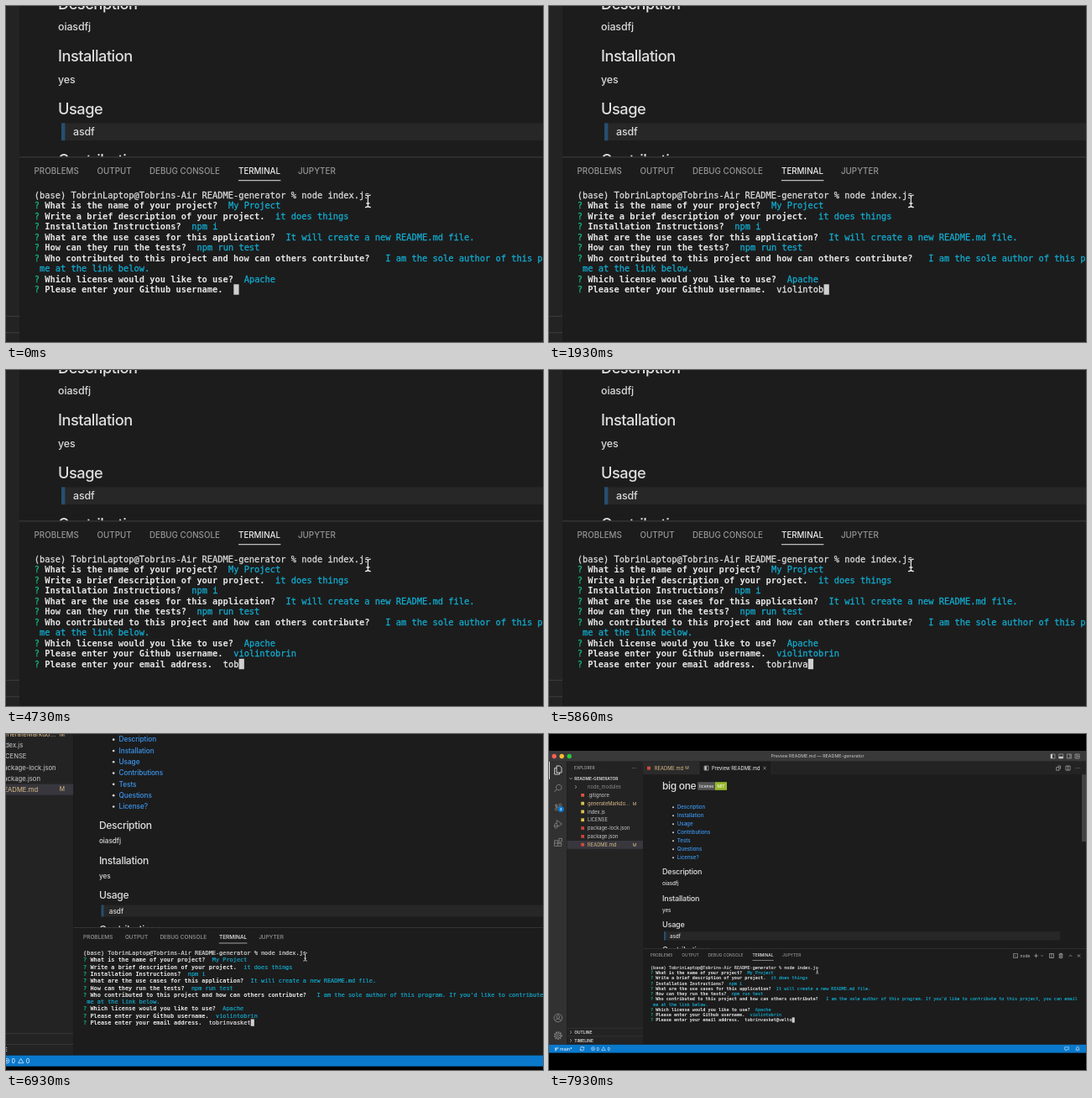
These frames come from a looping animation (640x400 px, 8000 ms). An HTML page with a canvas:

```html
<!DOCTYPE html>
<html lang="en">
<head>
<meta charset="utf-8">
<title>README generator</title>
<style>
  html, body { margin: 0; width: 100%; height: 100%; overflow: hidden; background: #000; }
  canvas { display: block; width: 640px; height: 400px; }
</style>
</head>
<body>
<canvas id="stage"></canvas>
<script>
const canvas = document.getElementById('stage');
const ctx = canvas.getContext('2d');
const dpr = window.devicePixelRatio || 1;
canvas.width = 640 * dpr;
canvas.height = 400 * dpr;

const LOOP = 8000;
const SANS = 'Inter, "Liberation Sans", sans-serif';
const MONO = '"DejaVu Sans Mono", "Liberation Mono", monospace';
const MONO_SIZE = 5.187, CHAR = 3.123, LINE = 6.25;
const TERM_X = 120.9, TERM_Y = 278;
const FOCUS = { x: 208, y: 331 };
const C = {
  editor: '#1c1c1c', side: '#232324', activity: '#313131', title: '#393939',
  tab: '#2b2b2b', line: '#3f3f3f', status: '#0a79cc', text: '#cccccc', dim: '#8a8a8a',
  white: '#e6e6e6', link: '#3c97f0', changed: '#dfbd8a', green: '#12b877', cyan: '#12acd0'
};

const USER = 'violintobrin';
const MAIL = 'tobrinvasket@velto';
const USER_KEYS = [[60, 1], [1000, 6], [1260, 6], [1900, 9], [2260, 12]];
const MAIL_KEYS = [[4060, 1], [4260, 2], [4400, 2], [5200, 6], [5820, 8], [6700, 12], [7000, 12], [7900, 18]];
const USER_SENT = 2600;
const ZOOM_START = 6413, ZOOM_TIME = 871;

function rect(x, y, w, h, color) {
  ctx.fillStyle = color;
  ctx.fillRect(x, y, w, h);
}

function dot(x, y, r, color) {
  ctx.fillStyle = color;
  ctx.beginPath();
  ctx.arc(x, y, r, 0, 7);
  ctx.fill();
}

// Text is set ten times larger and scaled down, so advances stay fractional.
function text(str, x, y, size, color, { weight = 400, font = SANS, track = 0, align = 'left', heft = 0 } = {}) {
  ctx.save();
  ctx.translate(x, y + size * 0.36);
  ctx.scale(0.1, 0.1);
  ctx.font = `${weight} ${size * 10}px ${font}`;
  ctx.letterSpacing = `${track * size * 10}px`;
  ctx.textAlign = align;
  ctx.fillStyle = ctx.strokeStyle = color;
  ctx.fillText(str, 0, 0);
  if (heft) {
    ctx.lineWidth = heft * size * 10;
    ctx.lineJoin = 'round';
    ctx.strokeText(str, 0, 0);
  }
  ctx.restore();
}

// Icon strokes are given around their own centre.
function icon(x, y, d, color = C.text, width = 0.6) {
  ctx.save();
  ctx.translate(x, y);
  ctx.strokeStyle = color;
  ctx.lineWidth = width;
  ctx.stroke(new Path2D(d));
  ctx.restore();
}

const I = {
  right: 'M-1 -1.8L.9 0L-1 1.8',
  down: 'M-1.8 -.9L0 .9L1.8 -.9',
  up: 'M-1.8 .9L0 -.9L1.8 .9',
  close: 'M-1.6 -1.6L1.6 1.6M1.6 -1.6L-1.6 1.6',
  plus: 'M-2.4 0H2.4M0 -2.4V2.4',
  box: 'M-2.5 -2.5H2.5V2.5H-2.5Z',
  split: 'M-2.5 -2.5H2.5V2.5H-2.5ZM0 -2.5V2.5',
  trash: 'M-2.4 -1.8H2.4M-1 -1.8V-2.7H1V-1.8M-1.8 -1.8V2.7H1.8V-1.8M-.6 -.6V1.6M.6 -.6V1.6',
  files: 'M-1.8 -5H2L4.2 -2.8V3H-1.8ZM-1.8 -2.4H-4.2V5H1.8V3',
  search: 'M-1.6 1.2A3.3 3.3 0 1 1 .2 2.3A3.3 3.3 0 0 1 -1.6 1.2L-4.6 4.7',
  branch: 'M-2 -2.2A1.4 1.4 0 1 1 -2.1 -2.2V2.2A1.4 1.4 0 1 1 -2.2 2.2M2.6 -.4A1.4 1.4 0 1 1 2.7 -.4C2.6 1.6 -2 .4 -2 2.2',
  debug: 'M-1.6 -.6V-4.8L4.6 -.4L.4 2.6M-4.4 1.2A1.9 2.2 0 1 1 -.6 1.2V2.6A1.9 2 0 1 1 -4.4 2.6ZM-5 2H0',
  blocks: 'M-4.4 -2.2H-.2V4.4H-4.4ZM-4.4 1H4V4.4H-.2M-.2 1H4M1 -4.6H4.6V-1H1Z',
  person: 'M-4.8 0A4.8 4.8 0 1 1 4.8 0A4.8 4.8 0 1 1 -4.8 0M-1.8 -1.2A1.8 1.8 0 1 1 1.8 -1.2A1.8 1.8 0 1 1 -1.8 -1.2M-3.2 3.4C-2.4 .4 2.4 .4 3.2 3.4',
  ring: 'M-1.4 0A1.4 1.4 0 1 1 1.4 0A1.4 1.4 0 1 1 -1.4 0',
  sync: 'M-2.2 -.2A2.2 2.2 0 0 1 2 -1M2.2 .2A2.2 2.2 0 0 1 -2 1M2.2 -2.2V-.8H.8M-2.2 2.2V.8H-.8',
  error: 'M-2 0A2 2 0 1 1 2 0A2 2 0 1 1 -2 0M-.8 -.8L.8 .8M.8 -.8L-.8 .8',
  warn: 'M0 -2L2.3 1.9H-2.3Z',
  chat: 'M-2.3 -2H2.3V1H.4L-1 2.4V1H-2.3Z',
  bell: 'M-2.2 1.4L-1.5 .4V-.8A1.5 1.5 0 0 1 1.5 -.8V.4L2.2 1.4ZM-.6 2.2H.6'
};

function more(x, y) {
  for (let i = -1; i <= 1; i++) dot(x + i * 1.9, y, 0.45, C.text);
}

function titleBar() {
  rect(0, 20, 640, 12.8, C.title);
  ['#fb5f57', '#fdbc2e', '#28c840'].forEach((c, i) => dot(6.2 + i * 9, 26.5, 2.7, c));
  text('Preview README.md — README-generator', 320, 26.4, 5.35, C.text, { align: 'center' });
  for (let i = 0; i < 4; i++) icon(600.5 + i * 9.7, 26.5, I.box, C.text, 0.5);
  rect(598, 24, 2, 5, C.text);
  rect(607.7, 26.8, 5, 2.2, C.text);
  icon(619.9, 26.5, 'M1 -2.5V2.5', C.text, 0.5);
  icon(629.6, 26.5, 'M-.5 -2.5V2.5M-.5 0H2.5', C.text, 0.5);
}

function activityBar() {
  rect(0, 32.8, 21.6, 337, C.activity);
  rect(0, 32.8, 0.9, 21, '#e8e8e8');
  icon(10.8, 43, I.files, '#f2f2f2', 0.8);
  [[64.5, I.search], [86, I.branch], [107.5, I.debug], [129, I.blocks], [338, I.person], [359, I.ring]]
    .forEach(([y, d]) => icon(10.8, y, d, C.dim, 0.8));
  dot(14.2, 89.5, 3.5, C.status);
  text('2', 14.2, 89.5, 4, '#fff', { align: 'center', weight: 600 });
  ctx.strokeStyle = C.dim;
  ctx.lineWidth = 1.4;
  ctx.setLineDash([1.55, 1.2]);
  ctx.beginPath();
  ctx.arc(10.8, 359, 4.2, 0, Math.PI * 2);
  ctx.stroke();
  ctx.setLineDash([]);
  icon(10.8, 359, 'M-3.2 0A3.2 3.2 0 1 1 3.2 0A3.2 3.2 0 1 1 -3.2 0', C.dim, 0.8);
}

const FILES = [
  ['node_modules', '#8b8b8b'],
  ['.gitignore', C.text, '#e0533a'],
  ['generateMarkdo...', C.changed, '#d9c04a', 'M'],
  ['index.js', C.text, '#d9c04a'],
  ['LICENSE', C.text, '#d9c04a'],
  ['package-lock.json', C.text, '#cc4038'],
  ['package.json', C.text, '#cc4038'],
  ['README.md', C.changed, '#d0493c', 'M']
];

function sideBar() {
  rect(21.6, 32.8, 90.4, 337, C.side);
  text('EXPLORER', 30, 40.6, 4.8, '#bbbbbb');
  more(101.2, 40.6);
  icon(26, 53, I.down);
  text('README-GENERATOR', 30.3, 53, 4.8, C.text, { weight: 700 });
  rect(21.6, 127, 90.4, 9.8, '#37373d');
  FILES.forEach(([name, color, mark, state], i) => {
    const y = 63 + i * 9.82;
    if (mark) rect(38.2, y - 1.9, 3.8, 3.8, mark);
    else icon(32, y, I.right);
    text(name, 46, y, 5.78, color);
    if (state) text(state, 102, y, 5.2, color, { align: 'center' });
  });
  ['OUTLINE', 'TIMELINE'].forEach((name, i) => {
    const y = 355 + i * 9.8;
    rect(21.6, y - 5.1, 90.4, 0.5, C.line);
    icon(26, y, I.right);
    text(name, 30.3, y, 4.8, C.text, { weight: 700 });
  });
}

function editor() {
  rect(112, 32.8, 528, 337, C.editor);
  rect(112, 32.8, 528, 15.4, C.side);
  rect(112, 32.8, 67.5, 15.4, C.tab);
  rect(180, 32.8, 84, 15.4, C.editor);
  rect(117, 38.7, 4, 4, '#d0493c');
  text('README.md', 125.8, 40.6, 5.78, C.changed);
  text('M', 164.6, 40.6, 5, C.changed, { align: 'center' });
  icon(187.5, 40.6, I.split);
  rect(185.5, 38.5, 2, 4.2, C.text);
  text('Preview README.md', 194, 40.6, 5.78, '#f5f5f5');
  icon(257, 40.6, I.close);
  icon(607, 40.6, 'M-2.3 -1H1V2.6H-2.3ZM-.6 -2.6H2.5V1', C.text);
  icon(618.5, 40.6, I.split);
  more(630, 40.6);

  const head = (s, y, size = 9.1) => text(s, 135, y, size, '#dedede', { track: -0.027, weight: 500 });
  const para = (s, x, y, color = '#dadada') => text(s, x, y, 6.22, color, { track: -0.01, weight: 500 });
  head('big one', 62, 12);
  rect(177.3, 57.2, 20.7, 9.6, '#555');
  rect(198, 57.2, 14, 9.6, '#97b92c');
  text('license', 187.7, 62, 5, '#fff', { align: 'center' });
  text('MIT', 205, 62, 5, '#fff', { align: 'center' });
  ['Description', 'Installation', 'Usage', 'Contributions', 'Tests', 'Questions', 'License?'].forEach((s, i) => {
    dot(148, 87.2 + i * 10, 1, '#d4d4d4');
    para(s, 152.8, 87 + i * 10, C.link);
  });
  head('Description', 164);
  para('oiasdfj', 135, 178);
  head('Installation', 195.3);
  para('yes', 135, 209.3);
  head('Usage', 226.6);
  rect(137, 235.2, 472, 10.4, '#272727');
  rect(137, 235.2, 2.2, 10.4, '#264f70');
  para('asdf', 144, 240.5);
  head('Contributions', 257);
  rect(635, 48.2, 5, 80, '#434343');
}

function panel() {
  rect(112, 255.2, 528, 114.6, C.editor);
  rect(112, 255.2, 528, 0.5, C.line);
  [['PROBLEMS', 120.8], ['OUTPUT', 158.3], ['DEBUG CONSOLE', 189.5], ['TERMINAL', 242.5], ['JUPYTER', 278]]
    .forEach(([s, x]) => text(s, x, 263.5, 4.89, s === 'TERMINAL' ? '#ececec' : '#969696', { weight: 500 }));
  rect(242.5, 269.1, 25.2, 0.5, '#e7e7e7');
  icon(556, 264, I.box, C.text, 0.5);
  icon(555.5, 264, 'M-1 -1L.2 0L-1 1M.6 1.2H2', C.text, 0.4);
  text('node', 561.5, 263.8, 5, C.text);
  icon(580.5, 264, I.plus);
  icon(587.5, 264, 'M-1.2 -.6L0 .6L1.2 -.6');
  icon(599, 264, I.split);
  icon(610, 264, I.trash);
  icon(621.5, 264, I.up);
  icon(631.5, 264, I.close);
}

function mono(s, col, row, color, weight = 400) {
  const heft = weight === 400 ? 0.025 : 0;
  text(s, TERM_X + col * CHAR, TERM_Y + row * LINE, MONO_SIZE, color, { weight, heft, font: MONO });
}

// Draws a prompt line and returns the column where its answer ends.
function ask(question, row, answer = '', color = C.cyan, gap = 2) {
  const col = 2 + question.length + gap;
  mono('?', 0, row, C.green);
  mono(question, 2, row, C.white, 700);
  mono(answer, col, row, color);
  return col + answer.length;
}

function caret(col, row) {
  rect(TERM_X + col * CHAR + 0.1, TERM_Y + row * LINE - 3.1, CHAR, 6.2, '#cfcfcf');
}

function typed(str, keys, t) {
  if (t < keys[0][0]) return '';
  const next = keys.findIndex(k => k[0] > t);
  if (next < 0) return str;
  const [t0, n0] = keys[next - 1], [t1, n1] = keys[next];
  return str.slice(0, Math.floor(n0 + (n1 - n0) * (t - t0) / (t1 - t0)));
}

function terminal(t) {
  mono('(base) TobrinLaptop@Tobrins-Air README-generator % node index.js', 0, 0, '#dcdcdc');
  ask('What is the name of your project?', 1, 'My Project');
  ask('Write a brief description of your project.', 2, 'it does things');
  ask('Installation Instructions?', 3, 'npm i');
  ask('What are the use cases for this application?', 4, 'It will create a new README.md file.');
  ask('How can they run the tests?', 5, 'npm run test');
  ask('Who contributed to this project and how can others contribute?', 6,
    "I am the sole author of this program. If you'd like to contribute to this project, you can email", C.cyan, 3);
  mono('me at the link below.', 1, 7, C.cyan);
  ask('Which license would you like to use?', 8, 'Apache');
  const sent = t >= USER_SENT;
  const col = ask('Please enter your Github username.', 9, typed(USER, USER_KEYS, t), sent ? C.cyan : C.white);
  if (sent) caret(ask('Please enter your email address.', 10, typed(MAIL, MAIL_KEYS, t), C.white), 10);
  else caret(col, 9);
}

function statusBar() {
  rect(0, 369.8, 640, 9.8, C.status);
  ctx.save();
  ctx.translate(9, 374.7);
  ctx.scale(0.5, 0.5);
  icon(0, 0, I.branch, '#fff', 1);
  ctx.restore();
  text('main*', 13, 374.7, 5.33, '#fff');
  icon(39.5, 374.7, I.sync, '#fff');
  icon(52.5, 374.7, I.error, '#fff', 0.5);
  text('0', 56.5, 374.7, 5.33, '#fff');
  icon(65, 374.7, I.warn, '#fff', 0.5);
  text('0', 69.5, 374.7, 5.33, '#fff');
  icon(617, 374.7, I.chat, '#fff', 0.5);
  icon(630, 374.7, I.bell, '#fff', 0.5);
}

function pointer() {
  const beam = 'M-1.7 -3.6Q-.2 -3.6 0 -2.8Q.2 -3.6 1.7 -3.6M0 -2.8V2.8M-1.7 3.6Q-.2 3.6 0 2.8Q.2 3.6 1.7 3.6M-1 1.3H1';
  icon(319.7, 281.7, beam, '#141414', 1.2);
  icon(319.7, 281.7, beam, '#e8e8e8', 0.65);
}

function zoom(t) {
  const u = Math.min(1, Math.max(0, (t - ZOOM_START) / ZOOM_TIME));
  const p = u < 0.5 ? 2 * u * u : 1 - 2 * (1 - u) * (1 - u);
  return 2 - p;
}

function draw(t) {
  const s = zoom(t);
  ctx.setTransform(dpr, 0, 0, dpr, 0, 0);
  rect(0, 0, 640, 400, '#000');
  ctx.translate(FOCUS.x * (1 - s), FOCUS.y * (1 - s));
  ctx.scale(s, s);
  titleBar();
  editor();
  panel();
  terminal(t);
  activityBar();
  sideBar();
  statusBar();
  pointer();
}

let start;
function frame(now) {
  start ??= now;
  draw((now - start) % LOOP);
  requestAnimationFrame(frame);
}
draw(0);
requestAnimationFrame(frame);
</script>
</body>
</html>
```
